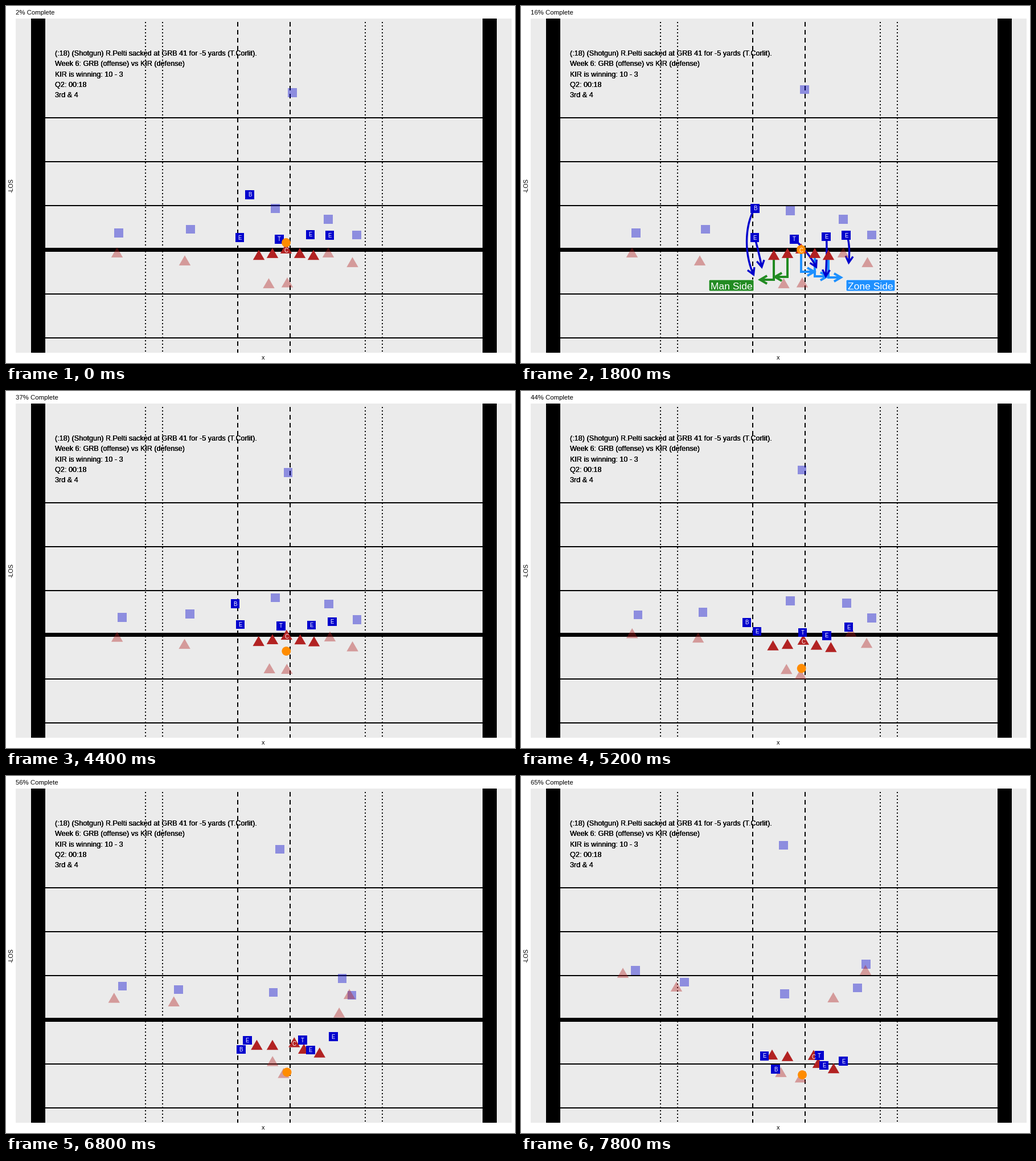
A matplotlib script for the animation above (8000 ms loop, 894x626 px).

```python
import matplotlib.pyplot as plt
import numpy as np
from matplotlib.animation import FuncAnimation
from matplotlib.patches import Circle, FancyBboxPatch, Polygon, Rectangle

W, H, DPI = 894, 626, 100
PX = 72 / DPI
FRAMES, TOTAL = 40, 62
SNAP, HOLD_END, LAST = 5, 19, 25
LOS, FIVE_YARDS, MID_X = 427.4, 77.25, 452.75
BLUE, RED, ORANGE = "mediumblue", "firebrick", "darkorange"
MAN, ZONE = "forestgreen", "dodgerblue"
SQUARE = 7.7 * np.array([(-1, -1), (1, -1), (1, 1), (-1, 1)])
TRIANGLE = np.array([(0, -9.7), (10.2, 7.9), (-10.2, 7.9)])

plt.rcParams["font.family"] = "Liberation Sans"
fig = plt.figure(figsize=(W / DPI, H / DPI), dpi=DPI, facecolor="white")
ax = fig.add_axes([0, 0, 1, 1])
ax.set_xlim(0, W)
ax.set_ylim(H, 0)
ax.axis("off")


def write(x, y, s, size, color="black", **kw):
    return ax.text(x, y, s, fontsize=size * PX, color=color, **kw)


def block(x0, y0, x1, y1, color="black"):
    ax.add_patch(Rectangle((x0, y0), x1 - x0, y1 - y0, fc=color, lw=0,
                           snap=False, zorder=1))


def progress(t):
    """0 at the snap, 1 at the last moment shown."""
    return np.clip((np.asarray(t, float) - SNAP) / (LAST - SNAP), 0, 1)


class Player:
    """Drifts steadily, then accelerates along run, bowed sideways by bend."""

    def __init__(self, start, run, bend=(0, 0), drift=(0, 0), shape=SQUARE,
                 color=BLUE, alpha=1.0, letter=""):
        self.start, self.run, self.bend, self.drift = start, run, bend, drift
        self.shape = shape
        self.patch = Polygon(shape, fc=color, alpha=alpha, lw=0, zorder=5)
        ax.add_patch(self.patch)
        self.label = write(0, 0, letter, 9.6, "white", ha="center", zorder=8)

    def at(self, t):
        u = progress(t)
        bow = 6.75 * u**2 * (1 - u)
        return np.array([s + d * (t - SNAP) + r * u**2 + b * bow for s, d, r, b
                         in zip(self.start, self.drift, self.run, self.bend)])

    def move(self, t):
        x, y = self.at(t)
        self.patch.set_xy(self.shape + (x, y))
        drop = 5.5 if self.shape is TRIANGLE else 3.5
        self.label.set_position((x, y + drop))


players = []


def add(*path, **look):
    players.append(Player(*path, **look))
    return players[-1]


def cover(*path):
    add(*path, alpha=0.4)


def runner(*path):
    add(*path, shape=TRIANGLE, color=RED, alpha=0.4)


def arrow(x, y, color, width, head):
    """Open-headed arrow along a path."""
    a = np.arctan2(y[-1] - y[-2], x[-1] - x[-2]) + np.pi
    wings = a + np.array([-1, 1]) * np.pi / 6
    hx = x[-1] + head * np.cos(wings)
    hy = y[-1] + head * np.sin(wings)
    style = dict(color=color, lw=width * PX, zorder=4, solid_capstyle="butt",
                 solid_joinstyle="miter")
    return (ax.plot(x, y, **style)
            + ax.plot([hx[0], x[-1], hx[1]], [hy[0], y[-1], hy[1]], **style))


def tag(x0, x1, s, color):
    box = FancyBboxPatch((x0 + 2, 482), x1 - x0 - 4, 16, fc=color, ec="white",
                         boxstyle="round,pad=2,rounding_size=2", lw=0.7,
                         zorder=6)
    ax.add_patch(box)
    text = write((x0 + x1) / 2, 497, s, 17.5, "white", ha="center", zorder=7)
    return [box, text]


# Field
block(17, 22, 888, 608, "#EBEBEB")
for k in (-3, -2, -1, 1, 2):
    y = round(LOS + k * FIVE_YARDS - 1)
    block(69, y, 837, y + 2)
block(69, 424, 837, 431)
for x in (44, 837):
    block(x, 22, x + 25, 608)
for offset, dash in ((46, (4, 3)), (178.25, (1, 2)), (207.75, (1, 2))):
    for x in (MID_X - offset, MID_X + offset):
        ax.plot([x, x], [28, 608], color="black", lw=2 * PX, ls=(0, dash),
                zorder=2)

# Captions
title = write(17, 15, "", 11.4)
write(452, 620, "x", 11, ha="center")
write(10, 315, "-LOS", 10.6, rotation=90, ha="center", va="center")
notes = ["(:18) (Shotgun) R.Pelti sacked at GRB 41 for -5 yards (T.Corlit).",
         "Week 6: GRB (offense) vs KIR (defense)",
         "KIR is winning: 10 - 3", "Q2: 00:18", "3rd & 4"]
for i, note in enumerate(notes):
    for _ in range(3):  # stacked copies give the heavy edges
        write(86, 87 + 18.35 * i, note, 12.6, zorder=3)

# Coverage defenders: start, run, bend, drift
cover((498, 146.5), (-17, -3), (8, 0), (-1, -1.1))
cover((473, 359), (-10, 7), (2, 5), (0, 0.8))
cover((202, 398), (-17, -57), (0, 3), (0.8, 0))
cover((324, 391.5), (-37, -30))
cover((566, 374), (40, -44), (2, 6))
cover((616, 401.5), (-25, -30), (6, 0))

# Receivers and backs
runner((195, 433), (-16, -87), (4, 6))
runner((314, 447), (-41, -77), (4, -8))
runner((566, 433), (39, -92), (16, 2))
runner((608.5, 450), (-60, -61), (11, 0))
runner((461.5, 487), (-5, 33), (10, -5))
runner((494, 485.5), (-3, 44), (-5, 12))

# The line sets up evenly around the center, who slides right
blockers = [Player((492 + 24 * k, 426 + 8 * abs(k)**0.5),
                   (3 + 3 * k + 19 * (k == 0), 64 + 6 * k), (2 + 2 * k, 6),
                   shape=TRIANGLE, color=RED, letter="" if k else "C")
            for k in range(-2, 3)]

# Pass rush
rushers = [
    add((410.5, 406), (17, 85), (4, 10), letter="E"),
    add((411, 355), (104, 63), (-6, 18), (-3.4, 4.8), letter="B"),
    add((480, 409), (44, 81), (17, 9), letter="T"),
    add((536, 404.5), (-10, 89), (0, 16), (0.3, 0.7), letter="E"),
    add((571, 402), (-15, 98), (5, 0), (0.5, 0), letter="E"),
]
players += blockers
blockers[2].patch.set_zorder(4.5)

ball = Circle((0, 0), 7.9, fc=ORANGE, lw=0, zorder=6)
ax.add_patch(ball)

# Protection scheme, shown while play is held at the snap
scheme = tag(330, 409, "Man Side", MAN) + tag(571, 657, "Zone Side", ZONE)
for b, depth, tip in zip(blockers, (480, 475, 466, 474, 476),
                         (-24, -22, 23, 22, 22)):
    x, y = b.start
    scheme += arrow((x, x, x + tip), (y, depth, depth),
                    MAN if tip < 0 else ZONE, 4, 14)
for r in rushers:
    scheme += arrow(*r.at(np.linspace(SNAP, 19, 40)), BLUE, 3.4, 13)


def draw(i):
    t = min(i, SNAP) if i <= HOLD_END else i - HOLD_END + SNAP
    u = progress(t)
    title.set_text(f"{round(100 * (i + 1) / TOTAL)}% Complete")
    for p in players:
        p.move(t)
    lead = 2.4 * min(t - SNAP, 0)
    ball.center = 492 + 2 * u, 427 + lead + 97 * (1 - (1 - u)**2.2)
    for s in scheme:
        s.set_visible(SNAP <= i <= HOLD_END)
    return []


anim = FuncAnimation(fig, draw, frames=FRAMES, init_func=lambda: draw(0),
                     interval=200, repeat=True, repeat_delay=0, blit=False)
plt.show()
```
